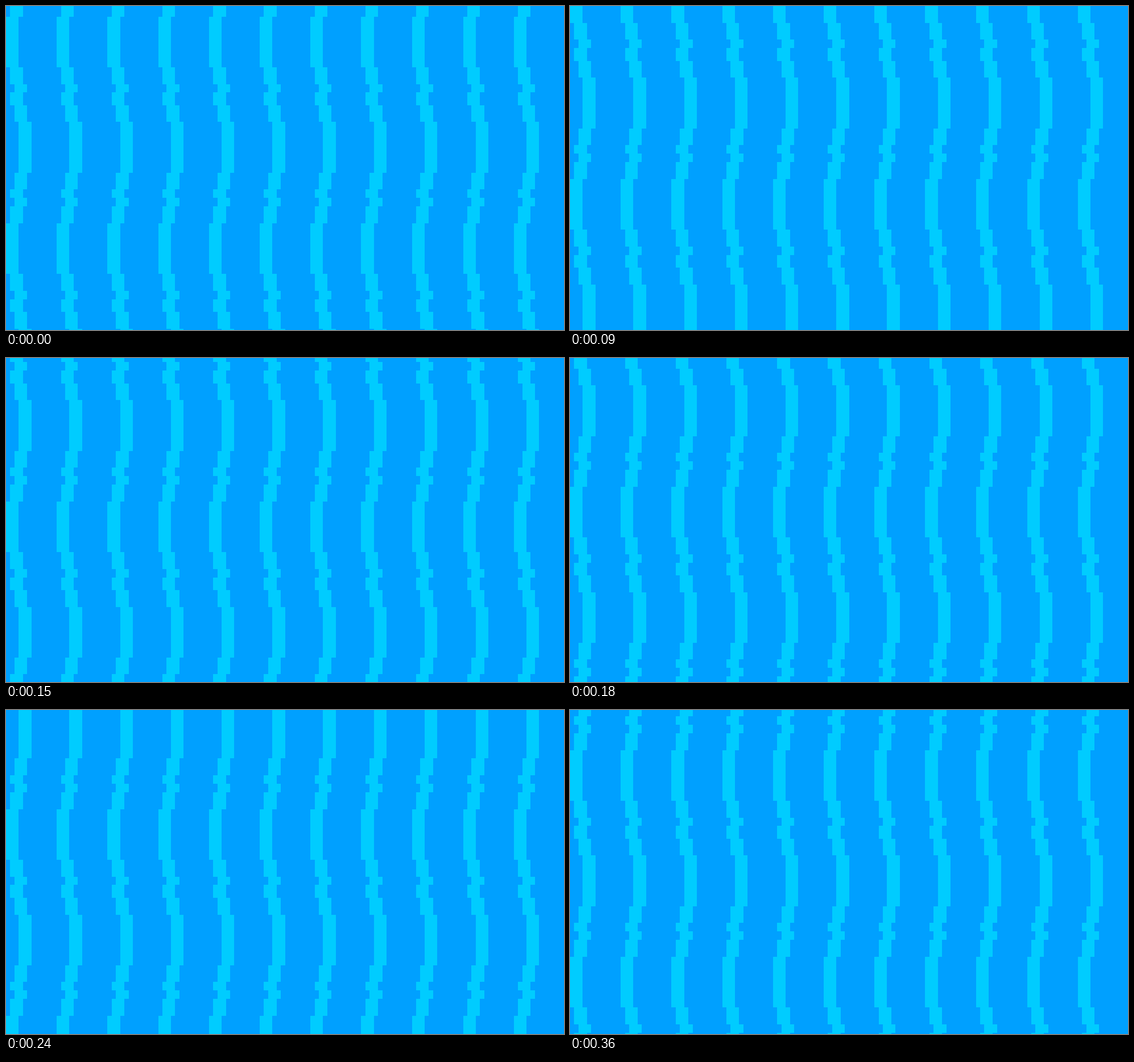
Write an HTML page with a canvas that moves like this. It is 981 by 571 pixels and loops after 0.39 s.

```html
<!DOCTYPE html>
<html lang="en">
<head>
<meta charset="utf-8">
<title>Pixel water</title>
<style>
  html, body { margin: 0; width: 100%; height: 100%; overflow: hidden; background: #00a0ff; }
  canvas { display: block; }
</style>
</head>
<body>
<canvas id="stage" width="981" height="571"></canvas>
<script>
const canvas = document.getElementById("stage");
const ctx = canvas.getContext("2d");

const CELL = 7.433;
const STRIPES = 11;
const STRIPE_GAP = 12 * CELL;
const STRIPE_WIDTH = 3;
const FRAME_MS = 30;
const FRAME_COUNT = 13;
const RISE_CELLS = 3.5;
const START_CELLS = 2.5;

// One wave of a stripe, top to bottom: [sideways shift, height] in cells.
const WAVE = [
  [0, 12], [1, 4], [2, 2], [1, 3], [2, 4],
  [3, 12], [2, 4], [1, 2], [2, 2], [1, 4]
];
const WAVE_CELLS = WAVE.reduce((sum, [, height]) => sum + height, 0);

// The last two stripes sit slightly further right than the even spacing.
const stripeX = index => index * STRIPE_GAP + (index > 8 ? 0.8 : 0);

function drawBand(shift, top, bottom) {
  for (let i = 0; i < STRIPES; i++) {
    const left = Math.round(stripeX(i) + shift * CELL);
    const right = Math.round(stripeX(i) + (shift + STRIPE_WIDTH) * CELL);
    ctx.fillRect(left, top, right - left, bottom - top);
  }
}

function draw(frame) {
  ctx.fillStyle = "#00a0ff";
  ctx.fillRect(0, 0, canvas.width, canvas.height);
  ctx.fillStyle = "#00ccff";

  let row = START_CELLS - frame * RISE_CELLS - WAVE_CELLS;
  while (row * CELL < canvas.height) {
    for (const [shift, height] of WAVE) {
      drawBand(shift, Math.round(row * CELL), Math.round((row + height) * CELL));
      row += height;
    }
  }
}

function tick() {
  draw(Math.floor(performance.now() / FRAME_MS) % FRAME_COUNT);
  requestAnimationFrame(tick);
}
tick();
</script>
</body>
</html>
```
